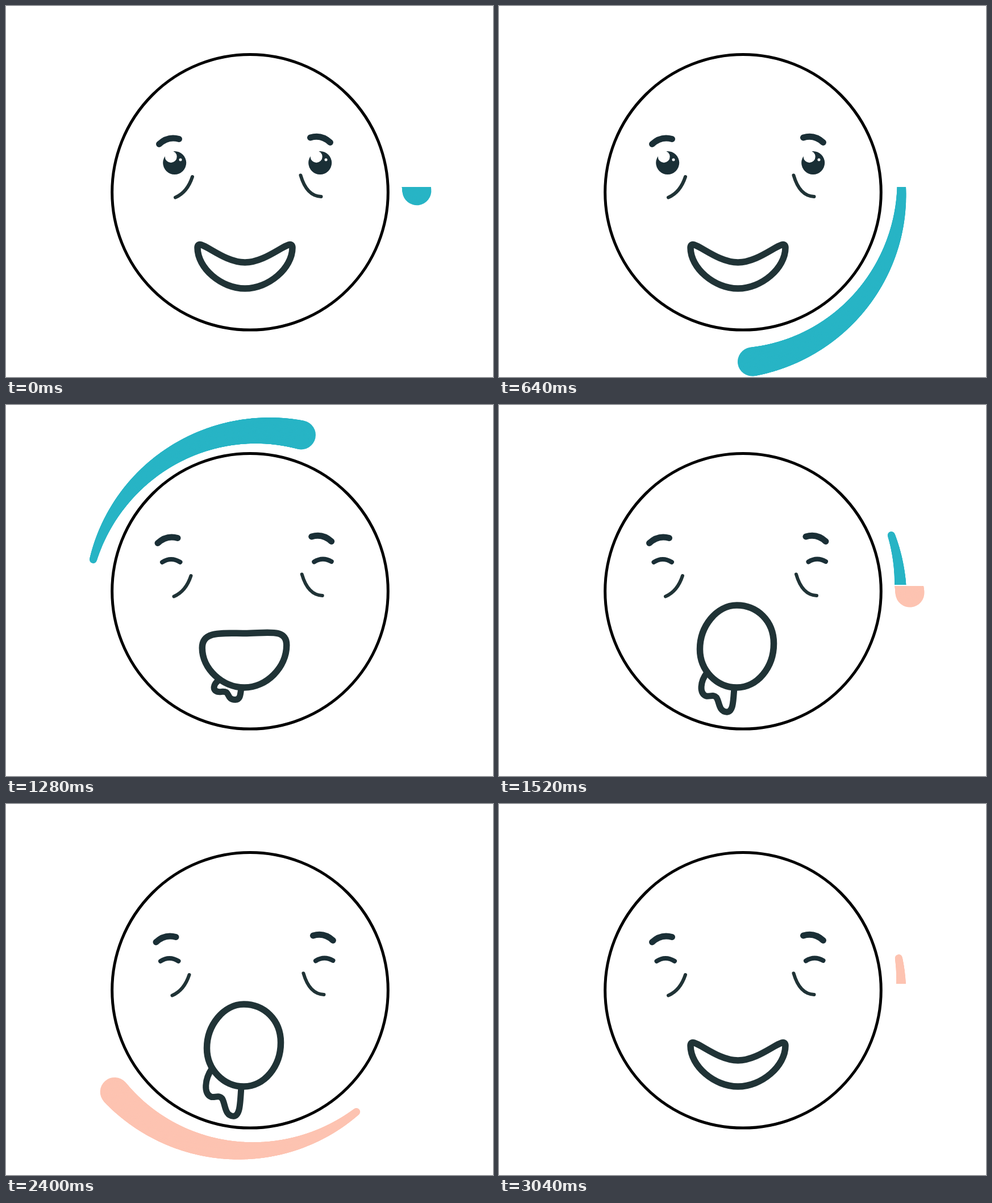
An HTML page with a canvas for the animation above (3120 ms loop, 857x654 px).

```html
<!DOCTYPE html>
<html lang="en">
<head>
<meta charset="utf-8">
<title>Face with spinner</title>
<style>
  html, body { margin: 0; width: 100%; height: 100%; overflow: hidden; background: #fff; }
  canvas { display: block; }
</style>
</head>
<body>
<canvas id="stage" width="857" height="654"></canvas>
<script>
const ctx = document.getElementById('stage').getContext('2d');
const W = 857, H = 654, LOOP = 3120, STEP = 80;
const INK = '#1a2f36', LINE = '#203336', TEAL = '#27b4c5', PINK = '#fdc3b1';

// Mouth: centre x, half width, side y, tilt, top y, side handle, roundness.
const SMILE = [420.5, 83.5, 426, 0, 452, 21, 0.5];
const OVAL = [418.5, 65, 425.5, 5, 353, 40, 0.55];
const ROUND = [419, 74.5, 420, 5, 342, 43, 0.55];

// Time, then mouth, drool length and sideways spread of the eyes.
const KEYS = [
  [0, [...SMILE, 0, 0]],
  [1040, [...SMILE, 0, 0]],
  [1520, [...OVAL, 0.8, 5]],
  [2000, [...ROUND, 1, 6.2]],
  [2400, [...OVAL, 0.97, 5.5]],
  [2960, [...SMILE, 0, 0]],
  [LOOP, [...SMILE, 0, 0]]
];

function poseAt(t) {
  const i = KEYS.findIndex(k => k[0] > t);
  const [t0, a] = KEYS[i - 1], [t1, b] = KEYS[i];
  return a.map((v, n) => v + (b[n] - v) * (t - t0) / (t1 - t0));
}

// Head angles in degrees at even intervals, joined by a smooth spline.
const SPIN = [-10, -1.4, 35, 86.7, 163, 288, 484, 670], SPIN_GAP = 320, SPIN_TIME = 1600;

function spinAngle(age) {
  const i = Math.floor(age / SPIN_GAP), k = age / SPIN_GAP - i;
  const [a, b, c, d] = SPIN.slice(i, i + 4);
  return b + k / 2 * (c - a + k * (2 * a - 5 * b + 4 * c - d + k * (3 * (b - c) + d - a)));
}

const TAIL = 95.6, CX = 428.5, CY = 333, RAD = Math.PI / 180;

function cometPoint(head, back) {
  const r = 307 - 29.5 * Math.cos((back - 65) * RAD);
  const a = (head - back) * RAD;
  return [CX + r * Math.cos(a), CY + r * Math.sin(a)];
}

function comet(age, color) {
  if (age < 0 || age >= SPIN_TIME) return;
  const head = spinAngle(age);
  ctx.strokeStyle = color;
  // The ring is cut open at the right: one pass below the seam, one above.
  for (const late of [false, true]) {
    ctx.save();
    ctx.beginPath();
    ctx.rect(0, 0, CX, H);
    if (late) ctx.rect(CX, 0, W, 317);
    else ctx.rect(CX, 319, W, H);
    ctx.clip();
    for (let d = 0; d < TAIL; d += 0.4) {
      const at = head - d;
      if (at < -10 || (at > 180) !== late) continue;
      ctx.lineWidth = 51 - 38 * d / TAIL;
      ctx.beginPath();
      ctx.moveTo(...cometPoint(head, d));
      ctx.lineTo(...cometPoint(head, d + 0.4));
      ctx.stroke();
    }
    ctx.restore();
  }
}

function disc(x, y, r, color) {
  ctx.fillStyle = color;
  ctx.beginPath();
  ctx.arc(x, y, r, 0, 7);
  ctx.fill();
}

function stroke(path, width, color) {
  ctx.lineWidth = width;
  ctx.strokeStyle = color;
  ctx.stroke(path);
}

function eye(x) {
  disc(x, 276.5, 20.5, INK);
  disc(x - 6.5, 265.7, 10.5, '#fff');
  disc(x + 10.3, 271, 2.5, '#fff');
}

function side(dx, open, brow, eyeX, lid, crease) {
  ctx.save();
  ctx.translate(dx, 0);
  stroke(new Path2D(brow), 11, INK);
  if (open) eye(eyeX);
  else stroke(new Path2D(lid), 8, INK);
  stroke(new Path2D(crease), 6, LINE);
  ctx.restore();
}

function mouthPath([cx, half, y, tilt, top, up, round]) {
  const path = new Path2D(), bottom = 498;
  const left = cx - half, right = cx + half, reach = half * round;
  const ly = y + tilt, ry = y - tilt;
  path.moveTo(left, ly);
  path.bezierCurveTo(left, ly - up, cx - reach, top, cx, top);
  path.bezierCurveTo(cx + reach, top, right, ry - up, right, ry);
  path.bezierCurveTo(right, ry + (bottom - ry) * round, cx + reach, bottom, cx, bottom);
  path.bezierCurveTo(cx - reach, bottom, left, ly + (bottom - ly) * round, left, ly);
  path.closePath();
  return path;
}

// Drool hangs from the lower lip and is drawn relative to its root.
const DROOL = new Path2D('M-52,-33C-65,-14 -68,14 -53,19C-45,20 -40,15 -34,22C-28,32 -30,53 -14,54C-2,53 -2,32 0,0');

function drool(size) {
  const path = new Path2D();
  path.addPath(DROOL, new DOMMatrix([0.6 + 0.4 * size, 0, 0, size, 414, 498]));
  stroke(path, 11, LINE);
}

function draw(t) {
  ctx.fillStyle = '#fff';
  ctx.fillRect(0, 0, W, H);
  ctx.lineCap = ctx.lineJoin = 'round';

  comet(t, TEAL);
  comet(t - 1506, PINK);

  ctx.lineWidth = 5;
  ctx.strokeStyle = '#000';
  ctx.beginPath();
  ctx.arc(429.5, 328.3, 242.8, 0, 7);
  ctx.stroke();

  const pose = poseAt(t), [length, spread] = pose.slice(7), open = t < 800;
  side(-spread, open, 'M269.5,243.5Q285,229 304.5,234.5', 296.7,
    'M277.5,277Q293,267 309,277', 'M328,301Q319,328.5 298,337.5');
  side(spread * 0.9, open, 'M535.5,232Q555,226 570.5,240.5', 552.7,
    'M540,276.5Q555,267 570.5,276', 'M518.5,298.5Q529,335 554.5,336');

  if (length > 0) drool(length);
  const mouth = mouthPath(pose);
  ctx.fillStyle = '#fff';
  ctx.fill(mouth);
  stroke(mouth, 11.5, LINE);
}

const start = performance.now();
function tick() {
  const t = (performance.now() - start) % LOOP;
  draw(Math.floor(t / STEP) * STEP);
  requestAnimationFrame(tick);
}
tick();
</script>
</body>
</html>
```
